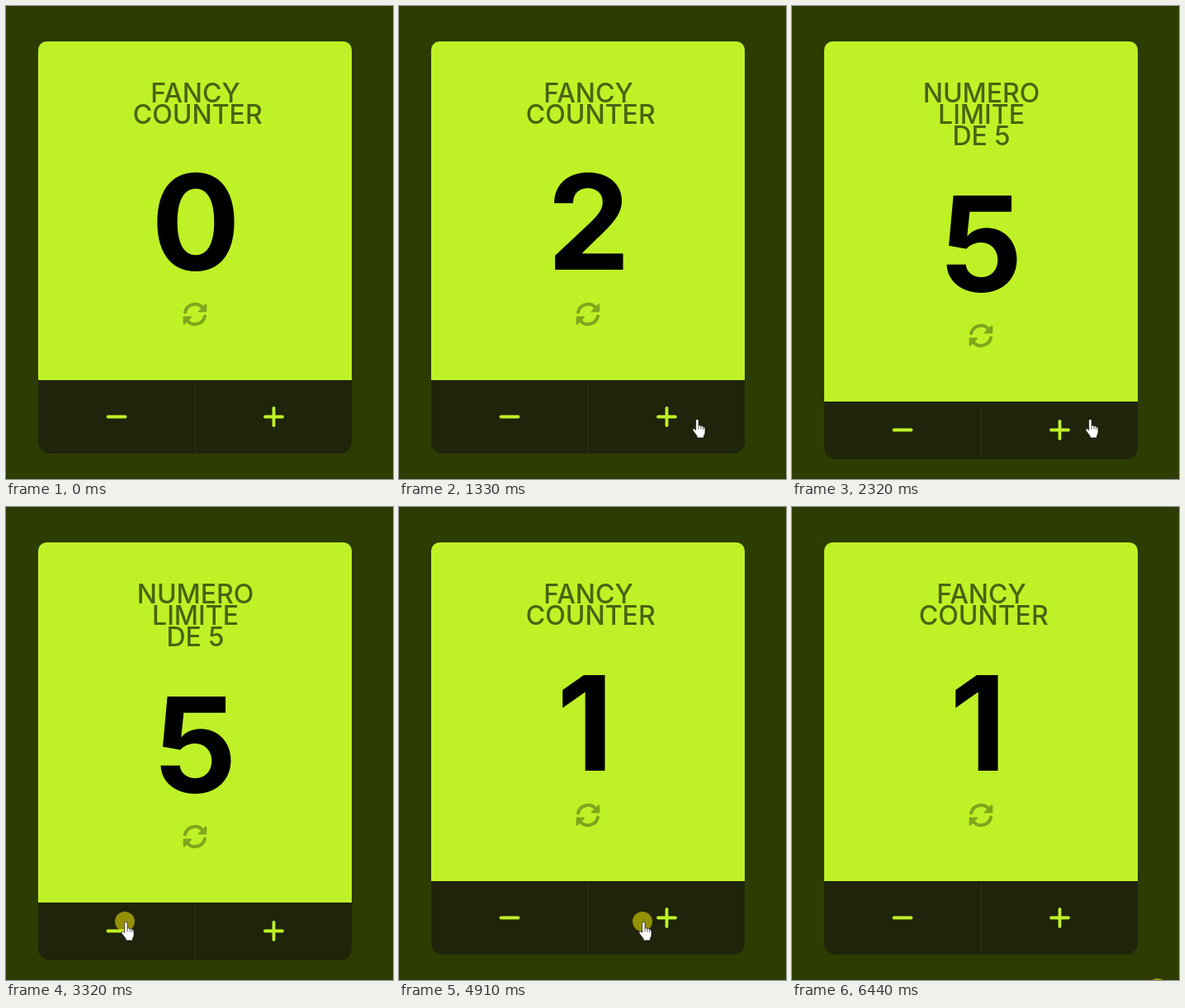
These frames come from a looping animation (469x574 px, 6.51 s). An HTML page:

```html
<!DOCTYPE html>
<html lang="en">
<head>
<meta charset="utf-8">
<title>Fancy counter</title>
<style>
  html, body { margin: 0; height: 100%; overflow: hidden; background: #2d3c00; }
  svg { display: block; width: 100%; height: 100%; font-family: Inter, sans-serif; }
  .title { font-size: 32px; font-weight: 450; fill: #4a6310; }
  .middle { text-anchor: middle; }
  #count { font-size: 160px; font-weight: 700; }
  .sign { stroke: #bef227; stroke-width: 3.8; stroke-linecap: round; }
  .pointer { fill: #fff; stroke: #111; stroke-width: .7; stroke-linejoin: round; }
</style>
</head>
<body>
<svg viewBox="0 0 469 574">
  <defs>
    <g id="arrow">
      <path d="M217 371.5A12.2 12.2 0 0 1 238.5 366.5" fill="none" stroke="#81a51c" stroke-width="4" stroke-linecap="round"/>
      <path d="M241.8 361.3Q243.3 361 243.3 362.8V370.3Q243.3 371.6 242 371.6H234Q232 371.6 233.2 370Z" fill="#81a51c"/>
    </g>
  </defs>

  <path id="buttons" fill="#1f240a"/>
  <path id="face" fill="#bef227"/>
  <path id="divider" stroke="#2d3214"/>

  <g id="normalTitle" class="title">
    <text class="middle" x="229.5" y="117">FANCY</text>
    <text x="153.8" y="143">COUNTER</text>
  </g>
  <g id="limitTitle" class="title middle">
    <text x="229.5" y="117">NUMERO</text>
    <text x="229.5" y="143">LIMITE</text>
    <text x="229.5" y="169">DE 5</text>
  </g>

  <g id="content">
    <text id="count" class="middle" y="320">0</text>
    <use href="#arrow"/>
    <use href="#arrow" transform="rotate(180 229 374)"/>
  </g>
  <g id="signs" class="sign">
    <path d="M123.5 0h21M314 0h21M324.5 -10.5v21"/>
  </g>

  <g id="cursor">
    <circle id="press" r="12" fill="#fff000" fill-opacity=".53"/>
    <g id="hand" class="pointer">
      <path d="M-.3 2.2Q-.3 .4 1.4 .4Q3.1 .4 3.1 2.2V8.3Q4.5 7.2 6 8.7Q7.4 8 8.5 9.5Q11 9.2 11 12V16.5Q11 18.5 9.5 20.3V23H1.2V21L-3.6 14.6Q-4.8 12.5 -3 11.8Q-1.8 11.5 -.3 13.6Z"/>
      <path d="M3.1 8.5v4M6 9v3.5M8.6 10v3" fill="none"/>
    </g>
    <path id="plain" class="pointer" d="M0 0V17L4 13.3L6.7 19.2L9.2 18L6.6 12.3H12Z"/>
  </g>
</svg>

<script>
const LOOP = 6510;
const FRAME = LOOP / 98;
const LIMIT = 5;
const $ = id => document.getElementById(id);
const show = (id, visible) => $(id).style.display = visible ? "" : "none";
const smooth = p => p * p * (3 - 2 * p);

// The pointer glides between the places where it clicks.
const entry = { x: 382, y: 575 };
const glides = [
  { start: 200, end: 600, x: 360, y: 501 },
  { start: 2550, end: 3050, x: 144, y: 503 },
  { start: 4450, end: 4710, x: 295, y: 503 },
  { start: 5190, end: 5570, x: 215, y: 374 },
  { start: 5920, end: 6240, x: 443, y: 584 }
];

// Runs of evenly spaced clicks; "first" is the first release.
const clicks = [
  { first: 1060, period: 240, times: 6, step: 1 },
  { first: 3380, period: 150, times: 5, step: -1 },
  { first: 4180, period: 270, times: 2, step: -1 },
  { first: 4835, period: 175, times: 3, step: 1 },
  { first: 5720, period: 120, times: 1, step: -2 },
  { first: LOOP, period: 120, times: 1, step: 0 }
].flatMap(({ first, period, times, step }) =>
  Array.from({ length: times }, (_, i) => {
    const up = first + i * period;
    return { down: up - 0.6 * period, up, step };
  }));

function counterAt(t) {
  let count = 0, limit = false;
  for (const { up, step } of clicks) {
    if (up > t) break;
    limit = count + step > LIMIT;
    count = Math.min(LIMIT, Math.max(0, count + step));
  }
  return { count, limit };
}

function pointerAt(t) {
  let { x, y } = entry;
  for (const g of glides) {
    const p = smooth(Math.min(1, Math.max(0, (t - g.start) / (g.end - g.start))));
    x += (g.x - x) * p;
    y += (g.y - y) * p;
  }
  return { x, y };
}

function drawCard({ count, limit }) {
  const split = limit ? 480 : 454;
  const bottom = limit ? 550 : 543;
  $("face").setAttribute("d", `M39 ${split}V53a10 10 0 0 1 10 -10H409a10 10 0 0 1 10 10V${split}Z`);
  $("buttons").setAttribute("d",
    `M39 ${split}H419V${bottom - 14}a14 14 0 0 1 -14 14H53a14 14 0 0 1 -14 -14Z`);
  $("divider").setAttribute("d", `M229.5 ${split}V${bottom}`);
  $("signs").setAttribute("transform", `translate(0 ${limit ? 514.5 : 498.5})`);
  $("content").setAttribute("transform", `translate(0 ${limit ? 26 : 0})`);
  $("count").textContent = count;
  $("count").setAttribute("x", count === 1 ? 225.5 : 230); // the 1 sits further left
  show("normalTitle", !limit);
  show("limitTitle", limit);
}

function drawCursor(t) {
  const { x, y } = pointerAt(Math.floor(t / FRAME) * FRAME);
  const onButton = x > 39 && x < 419 && y > 454 && y < 543;
  const onReset = x > 213 && x < 245 && y > 360 && y < 388;
  $("cursor").setAttribute("transform", `translate(${x} ${y})`);
  show("hand", onButton || onReset);
  show("plain", !(onButton || onReset));
  show("press", clicks.some(c => t >= c.down && t < c.up));
}

const start = performance.now();
function tick() {
  const t = (performance.now() - start) % LOOP;
  drawCard(counterAt(t));
  drawCursor(t);
  requestAnimationFrame(tick);
}
tick();
</script>
</body>
</html>
```
